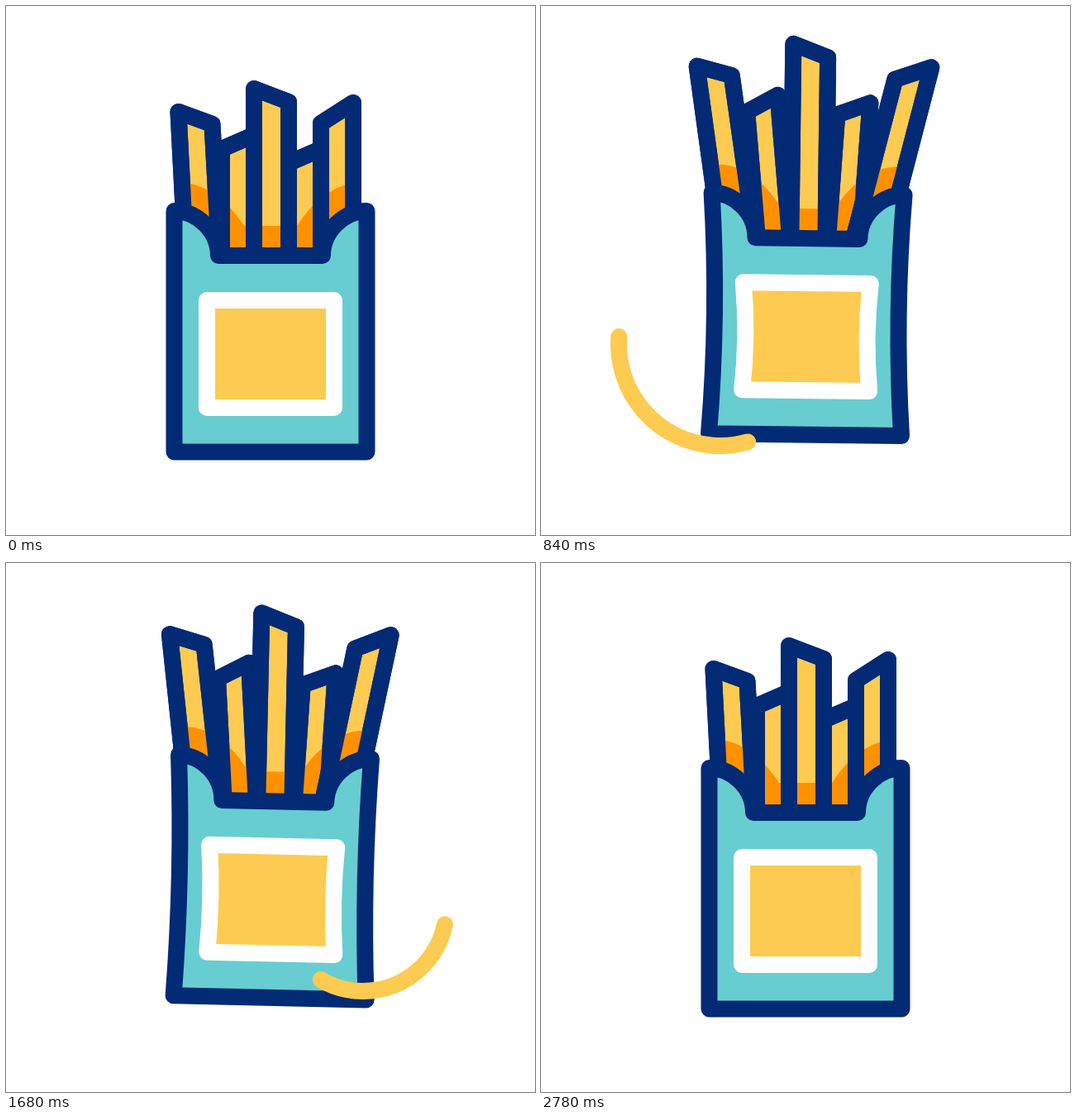
Write an HTML page with a canvas that moves like this. It is 640 by 640 pixels and loops after 3020 ms.

```html
<!DOCTYPE html>
<html lang="en">
<head>
<meta charset="utf-8">
<title>Jumping fries</title>
<style>
  html, body { margin: 0; width: 100%; height: 100%; overflow: hidden; background: #fff; }
  canvas { display: block; }
</style>
</head>
<body>
<canvas id="stage" width="640" height="640"></canvas>
<script>
const ctx = document.getElementById('stage').getContext('2d');
const LOOP = 3020, RAD = Math.PI / 180;
const NAVY = '#032a75', TEAL = '#67cdd1', YELLOW = '#fdcb52', ORANGE = '#ff9100';

const clamp = x => Math.min(1, Math.max(0, x));
const smooth = x => x * x * (3 - 2 * x);
// Half a sine wave between two times, zero outside
const pulse = (t, from, to) => Math.sin(Math.PI * clamp((t - from) / (to - from)));

// Two hops: squat and leap, each leaning right and then left
const lift = t => 13 * pulse(t, 220, 720) - 34 * pulse(t, 720, 1290)
  + 10 * pulse(t, 1290, 1595) - 34 * pulse(t, 1595, 2245);
const tilt = t => 2 * pulse(t, 220, 920) - pulse(t, 920, 1310)
  + 1.8 * pulse(t, 1310, 1800) - 1.4 * pulse(t, 1800, 2300);
const spread = t => 1.12 * pulse(t, 290, 1170) + 1.08 * pulse(t, 1430, 2370);
const squash = t => pulse(t, 220, 500) + pulse(t, 1280, 1520);

// Back to front; a fry turns around its pivot and rises as the bunch spreads
const fries = [
  { top: [261, 173, 300, 156], lean: 0, pivot: 343, turn: -5.3, rise: 25 },
  { top: [342, 190, 381, 173], lean: 0, pivot: 385, turn: 3.4, rise: 36 },
  { top: [208.5, 128, 249.5, 143], lean: 13, pivot: 385, turn: -5.4, rise: 36 },
  { top: [300, 100, 342, 116], lean: 0, pivot: 340, turn: 0, rise: 32 },
  { top: [381, 142, 420, 117], lean: 0, pivot: 317, turn: 13.4, rise: 33 }
];

const swooshes = [
  { start: 680, x: 217, y: 409, r: 123, left: true },
  { start: 1500, x: 432, y: 417, r: 101, left: false },
  { start: 2380, x: 432, y: 417, r: 81, left: false }
];

const orange = new Path2D('M150 214H215Q256 217 288 266H352Q384 217 425 214H490V400H150Z');

function paint(path, fill, stroke) {
  ctx.fillStyle = fill;
  ctx.fill(path);
  ctx.strokeStyle = stroke;
  ctx.stroke(path);
}

function drawFry({ top: [x1, y1, x2, y2], lean, pivot, turn, rise }, amount) {
  const x = (x1 + x2) / 2 + lean;
  const shape = new Path2D(`M${x1} ${y1}L${x2} ${y2}L${x2 + lean} 380H${x1 + lean}Z`);
  const path = new Path2D();
  path.addPath(shape, new DOMMatrix()
    .translate(x, pivot - rise * amount).rotate(turn * amount).translate(-x, -pivot));
  paint(path, YELLOW, NAVY);
  ctx.save();
  ctx.clip(path);
  ctx.fillStyle = ORANGE;
  ctx.fill(orange);
  ctx.restore();
  ctx.stroke(path);
}

function drawBox(bulge) {
  const side = 2 * bulge, inner = side * .65, low = 539.5 + Math.max(0, side) * .6;
  paint(new Path2D(`M203.5 248C231 248 257 272 257 302H383C383 272 409 248 436.5 248
    Q${436.5 + side} 394 436.5 539.5Q320 ${low} 203.5 539.5Q${203.5 - side} 394 203.5 248Z`), TEAL, NAVY);
  paint(new Path2D(`M243 356H397Q${397 + inner} 421 397 486H243Q${243 - inner} 421 243 356Z`), YELLOW, '#fff');
}

function drawSwoosh({ start, x, y, r, left }, t) {
  const age = t - start;
  if (age <= 0 || age >= 335) return;
  const angle = time => {
    const a = (155 * smooth(clamp(time / 220)) - 21) * RAD;
    return left ? Math.PI - a : a;
  };
  ctx.beginPath();
  ctx.arc(x, y, r, angle(age - 115), angle(age), left);
  ctx.strokeStyle = YELLOW;
  ctx.stroke();
}

function draw(t) {
  const amount = spread(t);
  ctx.fillStyle = '#fff';
  ctx.fillRect(0, 0, 640, 640);
  ctx.lineWidth = 20;
  ctx.lineJoin = ctx.lineCap = 'round';
  ctx.save();
  ctx.translate(320, 500 + lift(t));
  ctx.rotate(tilt(t) * RAD);
  ctx.translate(-320, -500);
  fries.forEach(fry => drawFry(fry, amount));
  drawBox(5 * (squash(t) - amount));
  ctx.restore();
  swooshes.forEach(swoosh => drawSwoosh(swoosh, t));
}

let begin;
function frame(now) {
  begin ??= now;
  draw((now - begin) % LOOP);
  requestAnimationFrame(frame);
}
requestAnimationFrame(frame);
</script>
</body>
</html>
```
